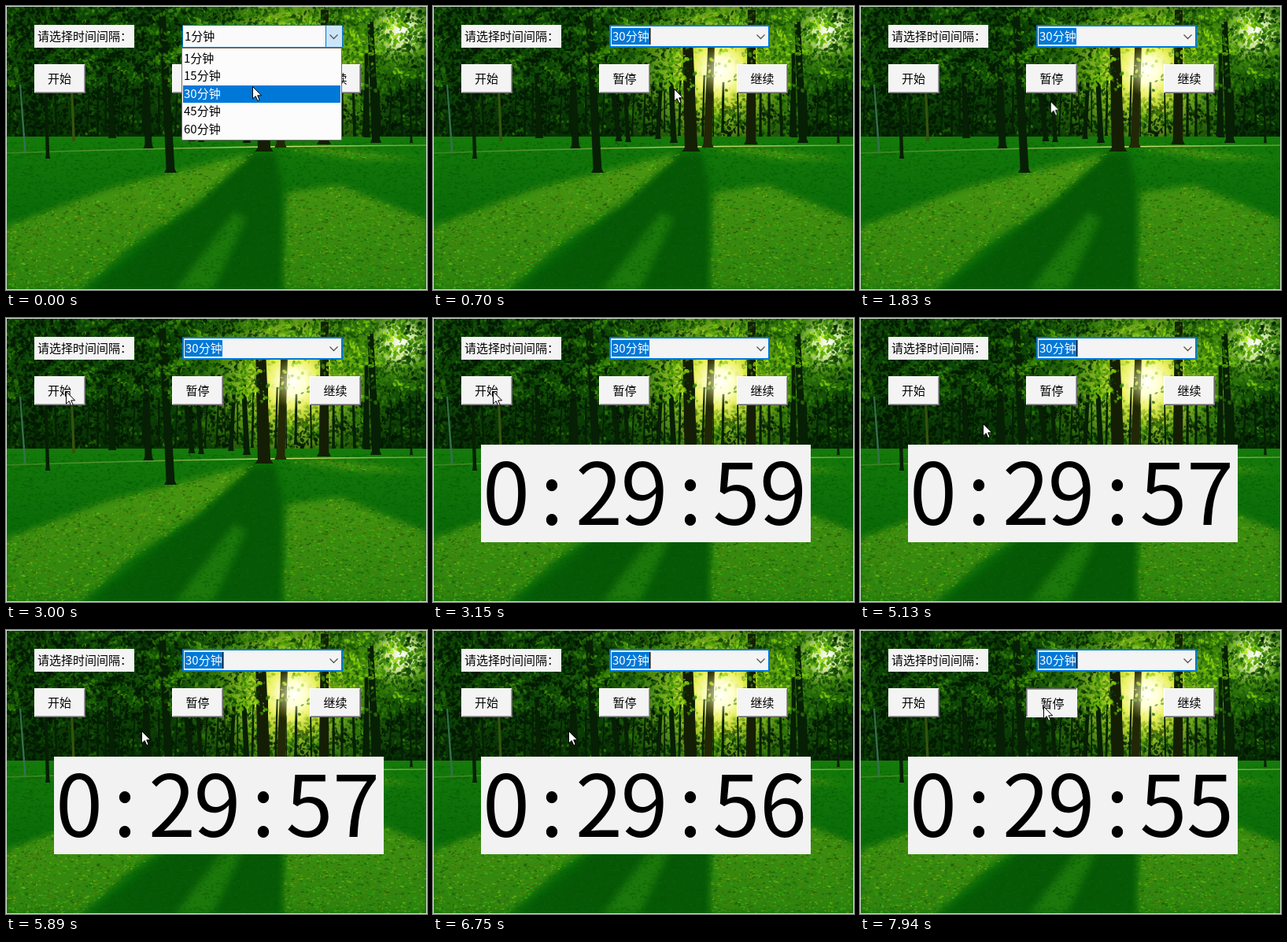
Write an HTML page with a canvas that moves like this. It is 535 px wide and 361 px high and loops after 8000 ms.

```html
<!DOCTYPE html>
<html lang="zh-CN">
<head>
<meta charset="utf-8">
<title>倒计时</title>
<style>
  html, body { margin: 0; width: 535px; height: 361px; overflow: hidden; background: #0a4a08; }
  canvas, svg.ui { position: absolute; left: 0; top: 0; display: block; }
  text { font: 15px "Noto Sans CJK SC", "Noto Sans CJK", "Noto Sans", sans-serif; fill: #000; }
  .mid { text-anchor: middle; }
  .inv { fill: #fff; }
  .big text { font-size: 108px; text-anchor: middle; }
  .face { fill: #f4f4f4; }
  .line { fill: none; stroke: #555; stroke-width: 1.3; }

  .open, .closed, .caret, .clock, .up, .down { animation: 8s step-end infinite; }
  .open { animation-name: open; }
  .closed { animation-name: closed; }
  .caret { animation-name: caret; }
  .clock { animation-name: clock; }
  .up { animation-name: up; }
  .down { animation-name: down; }
  .secs { animation: tick 8s step-end infinite; }
  .cursor { animation: move 8s infinite; }

  @keyframes open { 0% { opacity: 1 } 8.75%, 100% { opacity: 0 } }
  @keyframes closed { 0% { opacity: 0 } 8.75%, 100% { opacity: 1 } }
  @keyframes clock { 0% { opacity: 0 } 39.375%, 100% { opacity: 1 } }
  @keyframes up { 0% { opacity: 1 } 99.25%, 100% { opacity: 0 } }
  @keyframes down { 0% { opacity: 0 } 99.25%, 100% { opacity: 1 } }
  @keyframes caret {
    0%, 12.25%, 21.25%, 30%, 37.5%, 48.625%, 60.75%, 69%, 80.875%, 92% { opacity: 0 }
    8.75%, 15.625%, 24.75%, 34%, 41.25%, 52.125%, 64.125%, 73.5%, 84.375%, 95.3%, 100% { opacity: 1 }
  }
  @keyframes tick {
    0% { transform: translateY(0) }
    52.125% { transform: translateY(-140px) }
    64.125% { transform: translateY(-280px) }
    75.5% { transform: translateY(-420px) }
    89.375%, 100% { transform: translateY(-560px) }
  }
  @keyframes move {
    0% { transform: translate(313px, 102px); animation-timing-function: step-end }
    1.75% { transform: translate(306px, 105px); animation-timing-function: step-end }
    10.5625% { transform: translate(306px, 105px); animation-timing-function: steps(3) }
    15.625% { transform: translate(297px, 130px); animation-timing-function: step-end }
    17.75% { transform: translate(297px, 130px); animation-timing-function: steps(8) }
    31.75% { transform: translate(76px, 93px); animation-timing-function: step-end }
    52.125% { transform: translate(76px, 93px); animation-timing-function: steps(7) }
    64.125% { transform: translate(156px, 134px); animation-timing-function: steps(5) }
    73.525% { transform: translate(172px, 128px); animation-timing-function: step-end }
    89.375% { transform: translate(172px, 128px); animation-timing-function: steps(4) }
    97.25%, 100% { transform: translate(233px, 97px) }
  }
</style>
</head>
<body>
<canvas id="park" width="535" height="361"></canvas>

<svg class="ui" width="535" height="361" viewBox="0 0 535 361">
  <defs>
    <g id="raised">
      <path fill="#696969" d="M0 0H65V37H0Z"/>
      <path fill="#fff" d="M0 0H64V36H0Z"/>
      <path fill="#a0a0a0" d="M1 1H64V36H1Z"/>
      <path class="face" d="M1 1H63V35H1Z"/>
    </g>
    <g id="sunken">
      <path fill="#fff" d="M0 0H65V37H0Z"/>
      <path fill="#696969" d="M0 0H64V36H0Z"/>
      <path fill="#a0a0a0" d="M1 1H64V36H1Z"/>
      <path class="face" d="M2 2H64V36H2Z"/>
    </g>
  </defs>

  <rect class="face" x="36" y="24" width="127" height="29"/>
  <text x="40" y="44">请选择时间间隔：</text>

  <use href="#raised" x="36" y="74"/>
  <text class="mid" x="68" y="98">开始</text>
  <g class="up">
    <use href="#raised" x="211" y="74"/>
    <text class="mid" x="243.5" y="98">暂停</text>
  </g>
  <g class="down">
    <use href="#sunken" x="211" y="74"/>
    <text class="mid" x="244.5" y="99">暂停</text>
  </g>
  <use href="#raised" x="386" y="74"/>
  <text class="mid" x="418.5" y="98">继续</text>

  <g class="closed">
    <rect x="225" y="25" width="202" height="27" class="face" stroke="#0078d7" stroke-width="2"/>
    <rect x="227" y="28" width="48" height="21" fill="#0078d7"/>
    <text class="inv" x="228" y="44">30分钟</text>
    <rect class="caret" x="275" y="28" width="1.5" height="21" fill="#111"/>
    <path class="line" d="M411.5 36.5L416.5 41.5L421.5 36.5"/>
  </g>

  <g class="open">
    <rect x="224.5" y="24.5" width="203" height="28" fill="#fafafa" stroke="#0078d7"/>
    <text x="227" y="44">1分钟</text>
    <rect x="406.5" y="24.5" width="21" height="28" fill="#cce4f7" stroke="#0078d7"/>
    <path class="line" d="M411.5 36.5L416.5 41.5L421.5 36.5"/>
    <rect x="223.5" y="53.5" width="203" height="117" fill="#fcfcfc" stroke="#6c6c6c"/>
    <rect x="225" y="101" width="200" height="22" fill="#0078d7"/>
    <text x="226" y="72">1分钟</text>
    <text x="226" y="94">15分钟</text>
    <text class="inv" x="226" y="117">30分钟</text>
    <text x="226" y="139">45分钟</text>
    <text x="226" y="162">60分钟</text>
  </g>

  <g class="clock big">
    <rect x="61" y="161" width="419" height="124" fill="#f2f2f2"/>
    <text y="263" x="93 151 211 268.5 327 385.5">0:29:5</text>
    <svg x="415" y="161" width="64" height="124" overflow="hidden">
      <g class="secs">
        <text x="30" y="102">9</text>
        <text x="30" y="242">8</text>
        <text x="30" y="382">7</text>
        <text x="30" y="522">6</text>
        <text x="30" y="662">5</text>
      </g>
    </svg>
  </g>

  <rect x=".5" y=".5" width="534" height="360" fill="none" stroke="#d4dcd4"/>
  <path class="cursor" d="M.5 .5V16L4.2 12.6L6.8 18.5L9.2 17.5L6.7 11.8H11.6Z" fill="#fff" stroke="#000"/>
</svg>

<script>
const W = 535, H = 361;
const ctx = document.getElementById('park').getContext('2d');

let seed = 41;
function rnd() {
  seed = (seed * 1664525 + 1013904223) >>> 0;
  return seed / 4294967296;
}
const between = (a, b) => a + (b - a) * rnd();
const clamp = v => Math.min(1, Math.max(0, v));
const hsl = (h, s, l, a = 1) => `hsla(${h},${s}%,${l}%,${a})`;

function addStops(g, colors) {
  colors.forEach((c, i) => g.addColorStop(i / (colors.length - 1), c));
  return g;
}
const fade = (x0, y0, x1, y1, ...colors) =>
  addStops(ctx.createLinearGradient(x0, y0, x1, y1), colors);

function glow(x, y, r, ...colors) {
  ctx.fillStyle = addStops(ctx.createRadialGradient(x, y, 0, x, y, r), colors);
  ctx.fillRect(x - r, y - r, 2 * r, 2 * r);
}

function sunlight(x, y) {
  const sun = Math.hypot(x - 362, y - 80);
  const gap = Math.hypot((x - 505) * 0.7, y - 32);
  return Math.exp(-sun / 80) + 0.6 * Math.exp(-gap / 40);
}

// Clumped foliage, thinner where the sky shows through
function leaves(count, low, alpha) {
  for (let i = 0; i < count; i++) {
    const x = rnd() * W, y = rnd() * low;
    const sun = sunlight(x, y);
    if (sun > 0.66 && rnd() < 0.8) continue;
    const clump = Math.sin(x / 11 + Math.sin(y / 9) * 2) * Math.sin(y / 10 + x / 27);
    const depth = y > 105 ? 0.15 : 0;
    const light = clamp(sun * 0.8 + clump * 0.2 + between(-0.2, 0.36) - depth);
    ctx.fillStyle = hsl(118 - 44 * light, 88, 5 + 46 * light, alpha);
    ctx.beginPath();
    ctx.ellipse(x, y, between(1, 3.6), between(0.8, 2.4), rnd() * 3, 0, 7);
    ctx.fill();
  }
}

function trunk(topX, topY, x, y, w, color) {
  ctx.fillStyle = color;
  ctx.beginPath();
  ctx.moveTo(topX - w * 0.35, topY);
  ctx.lineTo(topX + w * 0.35, topY);
  ctx.lineTo(x + w * 0.45, y - 5);
  ctx.lineTo(x + w * 0.65, y);
  ctx.lineTo(x - w * 0.65, y);
  ctx.lineTo(x - w * 0.45, y - 5);
  ctx.fill();
}

function forest() {
  ctx.fillStyle = fade(0, 0, 0, 180, '#0d4408', '#0e4a08', '#062a04');
  ctx.fillRect(0, 0, W, 180);
  glow(362, 80, 150, '#ffffe8', '#d8ec3acc', '#74b81a66', '#3c8c1000');
  glow(502, 32, 60, '#ffffff', '#e8f8a8dd', '#90c83066', '#50a01400');
  leaves(6500, 165, 0.85);
  glow(364, 82, 62, '#ffffff', '#ffffe8', '#f6f86acc', '#d0e42a55', '#b4dc1e00');
  for (let x = 4; x < W; x += between(9, 21))
    trunk(x + between(-3, 3), between(85, 110), x, between(160, 168), between(1.5, 4), '#052004');
}

const lit = [
  new Path2D('M0 280L130 232L312 187L245 247L165 300L95 361H0Z'),
  new Path2D('M356 236L425 228L535 272V361H352Z'),
  new Path2D('M350 181L410 181L535 196L450 194Z')
];
const streak = new Path2D('M290 262L305 270L262 361H215Z');
const shadow = new Path2D('M312 187H343L352 240V361H262L300 275L225 361H110L245 250Z');

function meadow() {
  ctx.fillStyle = fade(0, 166, 0, H, '#147a0a', '#0a6c08', '#076607');
  ctx.fillRect(0, 166, W, H - 166);
  ctx.filter = 'blur(5px)';
  ctx.fillStyle = '#065806';
  ctx.fill(shadow);
  ctx.fillStyle = '#1c780b';
  ctx.fill(streak);
  ctx.fillStyle = fade(0, 185, 0, H, '#4c9812', '#3c8c10', '#2c820e');
  lit.forEach(p => ctx.fill(p));
  ctx.filter = 'none';
  for (let i = 0; i < 8000; i++) {
    const x = rnd() * W, y = between(172, H);
    const bright = lit.some(p => ctx.isPointInPath(p, x, y));
    ctx.fillStyle = bright
      ? hsl(between(76, 115), 84, between(17, 41), 0.7)
      : hsl(between(114, 121), 86, between(16, 23), 0.4);
    ctx.fillRect(x, y, between(1, 4), between(1, 2));
  }
  ctx.strokeStyle = fade(0, 0, W, 0, '#3c8420', '#5c9a35', '#d2e070', '#5ca028');
  ctx.lineWidth = 1.5;
  ctx.stroke(new Path2D('M0 187Q180 181 330 179T535 177'));
}

function trees() {
  const dark = '#071f05', warm = '#222806';
  [
    [18, 100, 24, 186, 3, '#34704a'], [50, 90, 53, 194, 5, dark],
    [83, 90, 86, 172, 4, '#35530f'], [132, 85, 135, 168, 8, dark],
    [178, 85, 181, 181, 10, dark], [198, 0, 209, 212, 12, dark],
    [226, 90, 236, 172, 7, dark], [243, 95, 248, 173, 6, dark],
    [290, 90, 286, 169, 6, dark], [302, 85, 306, 174, 8, dark],
    [323, 25, 328, 185, 18, '#141e05'], [354, 40, 349, 180, 12, warm],
    [405, 5, 404, 176, 14, '#141e05'], [458, 60, 459, 167, 7, dark],
    [463, 20, 470, 174, 11, dark], [513, 105, 515, 174, 3, dark]
  ].forEach(t => trunk(...t));
  leaves(1700, 108, 0.85);
  glow(366, 82, 34, '#ffffffdd', '#ffffb066', '#dce63c00');
}

forest();
meadow();
trees();
</script>
</body>
</html>
```
